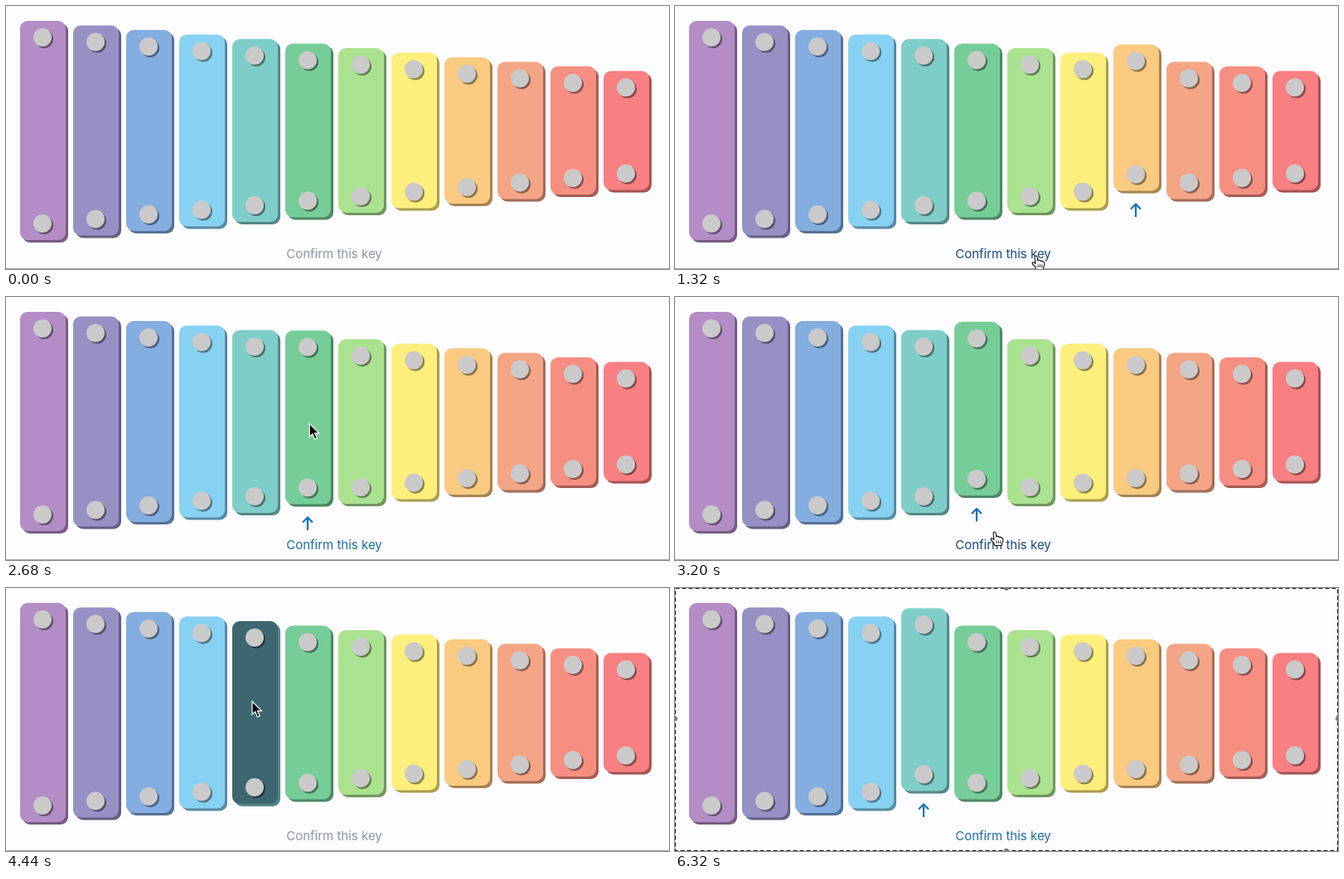
Write an HTML page that moves like this. It is 800 by 318 pixels and loops after 6360 ms.

```html
<!DOCTYPE html>
<html lang="en">
<head>
<meta charset="utf-8">
<title>Xylophone</title>
<style>
  html, body { margin: 0; width: 100%; height: 100%; overflow: hidden; background: #fdfcfe; }
  svg { display: block; width: 800px; height: 318px; }
  text { font: 15px Inter, Roboto, sans-serif; }
</style>
</head>
<body>
<svg id="stage" viewBox="0 0 800 318">
  <rect width="800" height="318" fill="#fdfcfe"/>
  <rect y="317" width="800" height="1" fill="#a9a8aa"/>
  <g id="keys"></g>
  <text id="label" x="396" y="305" text-anchor="middle">Confirm this key</text>
  <path id="arrow" d="M0 17V1.5M-6 7.5L0 1.5L6 7.5" fill="none" stroke="#1972b8" stroke-width="2.2"/>
  <g id="pointer">
    <path d="M0 0V16L3.7 12.6L6.4 19L9.2 17.8L6.5 11.6H11.4Z" fill="#000" stroke="#fff" stroke-width="1.2"/>
  </g>
  <g id="hand" stroke="#111" stroke-width="1.1" stroke-linejoin="round">
    <path fill="#fff" d="M-2 1.5Q-2 0-.5 0Q1 0 1.2 1.5L1.8 6Q2 5 3.5 5.2Q5 5.2 5 6.5Q6.5 5.6 7.7 7.2Q9.5 6.8 9.8 9Q10.2 12 8.5 14L8.2 16.5H0Q-1 13.5-3.5 11Q-5.5 9-4.5 8Q-3 7.3-1 9.5Z"/>
    <path d="M2 10.5V14M4.4 10.5V14M6.8 10.5V14" fill="none" stroke-width=".9"/>
  </g>
  <g id="selection">
    <rect x=".5" y=".5" width="799" height="317" fill="none" stroke="#fff"/>
    <rect x=".5" y=".5" width="799" height="317" fill="none" stroke="#111" stroke-dasharray="5 3"/>
    <g fill="#777">
      <circle cx="400" cy="0" r="3"/><circle cx="400" cy="318" r="3"/>
      <circle cx="0" cy="158" r="3"/><circle cx="800" cy="158" r="3"/>
    </g>
  </g>
</svg>
<script>
const LOOP = 6360, FRAME = 40, LIFT = 15.5, EASE_MS = 160;
const COLORS = ['#b48dc6', '#9790c4', '#84ade0', '#87d2f2', '#7fcdc9', '#76cd98',
                '#aae28f', '#fdef7b', '#f9ca80', '#f4a585', '#f78e82', '#f87f82'];

// Each pick: the key darkens on press, rises on release, drops on confirm.
const PICKS = [
  { key: 8, press: 640, release: 780, confirm: 1800 },
  { key: 5, press: 2480, release: 2620, confirm: 3880 },
  { key: 4, press: 4400, release: 4560, confirm: Infinity }
];

// Cursor stops: time, x, y
const PATH = [
  [200, 570, 250], [560, 556, 150], [820, 556, 150], [1200, 437, 301], [1320, 436, 302],
  [1880, 436, 302], [2200, 390, 170], [2400, 366, 152], [2660, 366, 152], [3040, 388, 278],
  [3200, 386, 284], [3480, 384, 301], [3900, 384, 301], [4320, 298, 140], [4440, 297, 137],
  [4620, 297, 137], [4960, 330, 322]
];

const $ = id => document.getElementById(id);
const clamp = v => Math.max(0, Math.min(1, v));
const smooth = v => { v = clamp(v); return v * v * (3 - 2 * v); };
const keyTop = i => 18 + 5.5 * i;
const keyBottom = i => 283 - 5.5 * i;

function add(parent, tag, attrs) {
  const node = document.createElementNS('http://www.w3.org/2000/svg', tag);
  for (const name in attrs) node.setAttribute(name, attrs[name]);
  return parent.appendChild(node);
}

const keys = COLORS.map((color, i) => {
  const group = add($('keys'), 'g', {});
  const x = 17 + 64 * i, y = keyTop(i), bottom = keyBottom(i);
  const bar = (offset, fill, opacity = 1) => add(group, 'rect', {
    x: x + offset, y: y + offset, width: 55, height: bottom - y, rx: 9, fill, opacity
  });
  bar(3, color);
  bar(3, '#000', .34);
  const face = bar(0, color);
  for (const cy of [y + 20, bottom - 20]) {
    add(group, 'circle', { cx: x + 29, cy: cy + 2, r: 11, fill: '#000', opacity: .45 });
    add(group, 'circle', { cx: x + 27, cy, r: 11, fill: '#cbcacb' });
  }
  return { group, face };
});

function cursorAt(t) {
  const next = PATH.findIndex(stop => stop[0] > t);
  if (next < 1) return null;
  const [t0, x0, y0] = PATH[next - 1], [t1, x1, y1] = PATH[next];
  const k = smooth((t - t0) / (t1 - t0));
  return { x: x0 + (x1 - x0) * k, y: y0 + (y1 - y0) * k };
}

function place(node, visible, x, y) {
  node.setAttribute('visibility', visible ? 'visible' : 'hidden');
  if (visible) node.setAttribute('transform', `translate(${x} ${y})`);
}

function render(t) {
  const lifts = COLORS.map(() => 0);
  let pressed = -1, chosen = -1;
  for (const p of PICKS) {
    lifts[p.key] = smooth((t - p.release) / EASE_MS) - smooth((t - p.confirm) / EASE_MS);
    if (t >= p.press && t < p.release) pressed = p.key;
    if (t >= p.release && t < p.confirm) chosen = p.key;
  }
  keys.forEach(({ group, face }, i) => {
    group.setAttribute('transform', `translate(0 ${-LIFT * lifts[i]})`);
    face.setAttribute('fill', i === pressed ? '#3d6770' : COLORS[i]);
  });

  const active = chosen >= 0;
  place($('arrow'), active, 44 + 64 * chosen, active ? keyBottom(chosen) - LIFT * lifts[chosen] + 14.5 : 0);

  const cursor = cursorAt(t);
  const hover = active && cursor && cursor.y > 282 && Math.abs(cursor.x - 396) < 66;
  place($('pointer'), cursor && !hover, cursor?.x, cursor?.y);
  place($('hand'), hover, cursor?.x, cursor?.y);
  $('label').setAttribute('fill', hover ? '#154a80' : active ? '#1c6ca8' : '#8997a1');
  $('selection').setAttribute('visibility', t >= LOOP - FRAME ? 'visible' : 'hidden');
}

const start = performance.now();
function tick() {
  const t = (performance.now() - start) % LOOP;
  render(Math.floor(t / FRAME) * FRAME);
  requestAnimationFrame(tick);
}
tick();
</script>
</body>
</html>
```
